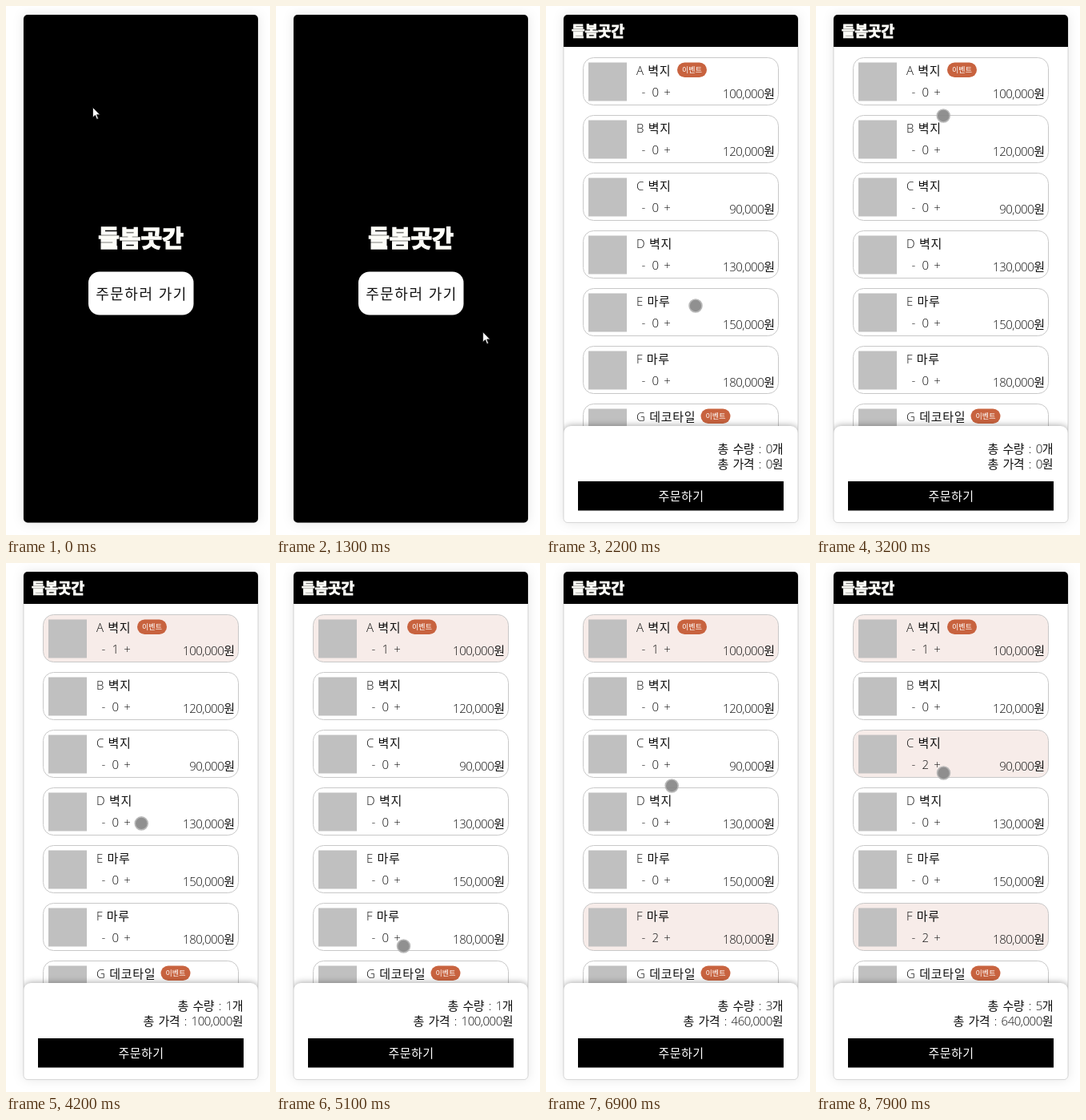
These frames come from a looping animation (330 by 660 pixels, 8000 ms). An HTML page:

```html
<!DOCTYPE html>
<html lang="ko">
<head>
<meta charset="utf-8">
<style>
html, body { margin: 0; width: 100%; height: 100%; overflow: hidden; background: #fff; }
svg { display: block; width: 330px; height: 660px; font: 300 15px "Open Sans", "Noto Sans CJK KR", "Noto Sans CJK", sans-serif; fill: #111; }
.phone { filter: drop-shadow(0 0 7px rgba(0,0,0,.1)); }
.sheet { filter: drop-shadow(0 0 4px rgba(0,0,0,.4)); }
.brand { font-weight: 900; fill: #fdfdf8; stroke: #fdfdf8; stroke-width: .05em; }
.mid { text-anchor: middle; }
.end { text-anchor: end; letter-spacing: -.5px; word-spacing: 2.3px; }
.name { letter-spacing: .7px; }
.badge { font-size: 9px; fill: #fff; }
.start { font-size: 18px; letter-spacing: 1.5px; }
.order { letter-spacing: .5px; fill: #fff; }
</style>
</head>
<body>
<svg viewBox="0 0 330 660">
  <defs><clipPath id="screen"><rect x="22" y="11" width="293" height="633.5" rx="5"/></clipPath></defs>
  <rect class="phone" x="22" y="11" width="293" height="633.5" rx="5" fill="#fff"/>
  <g id="view" clip-path="url(#screen)"></g>
  <rect x="22" y="11" width="293" height="633.5" rx="5" fill="none" stroke="#000" stroke-opacity=".15"/>
  <path id="arrow" d="M.5 .5V13l3-2.7 2 5 2-.8-2-4.8h4z" fill="#fff" stroke="#111" stroke-width=".8"/>
  <circle id="touch" r="8" fill="#878787" stroke="#b4b4b4" stroke-width="1.6" opacity=".92"/>
</svg>
<script>
const LOOP = 8000, STEP = 100, PRESS = 2000, OPEN = 2200, TRAVEL = 600;
const BRAND = '들봄곳간';
const $ = id => document.getElementById(id);

const items = [
  { kind: '벽지', price: 100000, event: true },
  { kind: '벽지', price: 120000 },
  { kind: '벽지', price: 90000 },
  { kind: '벽지', price: 130000 },
  { kind: '마루', price: 150000 },
  { kind: '마루', price: 180000 },
  { kind: '데코타일', price: 110000, event: true }
];
// The finger sets off for each row, then taps its plus sign.
const visits = [
  { leave: 2700, row: 0, taps: [3700] },
  { leave: 3870, row: 5, taps: [5600, 6200] },
  { leave: 6400, row: 2, taps: [7400, 7700] }
];

const cardTop = row => 64 + 72 * row;
const clamp = u => Math.min(1, Math.max(0, u));
const ease = u => u * u * (3 - 2 * u);
const mix = (a, b, p) => a.map((v, n) => v + (b[n] - v) * p);

function arrowAt(t) {
  return t < 1000
    ? mix([108, 126], [11, 127], clamp(t / 200))
    : mix([286, 421], [178.5, 364], ease(clamp((t - 1100) / 600)));
}

// Each trip bows left on the way up and right on the way down.
function touchAt(t) {
  return visits.reduce((from, { leave, row }) => {
    const to = [159.5, cardTop(row) + 54];
    const p = ease(clamp((t - leave) / TRAVEL));
    const [x, y] = mix(from, to, p);
    return [x + 10 * Math.sin(Math.PI * p) * Math.sign(to[1] - from[1]), y];
  }, [187, 374]);
}

const rect = (x, y, w, h, fill, more = '') =>
  `<rect x="${x}" y="${y}" width="${w}" height="${h}" fill="${fill}" ${more}/>`;
const text = (x, y, s, cls, more = '') => `<text x="${x}" y="${y}" class="${cls}" ${more}>${s}</text>`;
const won = n => n.toLocaleString('en-US') + '원';

function startPage(pressed) {
  const button = (fill, more) => rect(103, 331.5, 131.5, 54, fill, more);
  return rect(22, 11, 293, 634, '#000') +
    text(168.5, 301, BRAND, 'brand mid', 'font-size="29"') +
    button('#fff', 'rx="14"') +
    text(169.5, 365.5, '주문하러 가기', 'start mid') +
    (pressed ? button('rgba(100,180,222,.4)') : '');
}

function badge(x, y) {
  return rect(x, y, 37, 18.5, '#c8633f', 'rx="9.25"') + text(x + 18.5, y + 12.2, '이벤트', 'badge mid');
}

function card({ kind, price, event }, row, count) {
  const y = cardTop(row);
  return rect(46.5, y + .5, 244, 59, count ? '#f7ece9' : '#fff', 'rx="13" stroke="#c8c8c8"') +
    rect(53, y + 6.5, 48, 48, '#c0c0c0') +
    text(113, y + 21.5, 'ABCDEFG'[row] + ' ' + kind, 'name') +
    (event ? badge(134.5 + 14.75 * kind.length, y + 6.5) : '') +
    ['-', count, '+'].map((s, n) => text(122 + 14.8 * n, y + 49, s, 'mid')).join('') +
    text(285.5, y + 51, won(price), 'end');
}

function shopPage(counts) {
  const sum = f => counts.reduce((total, n, row) => total + n * f(row), 0);
  return rect(22, 11, 293, 634, '#fff') +
    rect(22, 11, 293, 40, '#000') +
    text(65, 38, BRAND, 'brand mid', 'font-size="18"') +
    items.map((item, row) => card(item, row, counts[row])).join('') +
    rect(22, 524, 293, 135, '#fff', 'rx="9" class="sheet"') +
    text(296, 557.5, `총 수량 : ${sum(() => 1)}개`, 'end') +
    text(296, 577, `총 가격 : ${won(sum(row => items[row].price))}`, 'end') +
    rect(40, 593, 257, 36.5, '#000') +
    text(169, 616.5, '주문하기', 'order mid');
}

function place(el, point, shown) {
  el.setAttribute('transform', `translate(${point})`);
  el.setAttribute('visibility', shown ? 'visible' : 'hidden');
}

let last;
function draw(now) {
  const t = Math.floor(now % LOOP / STEP) * STEP;
  const counts = items.map((_, row) =>
    visits.filter(v => v.row === row).flatMap(v => v.taps).filter(at => t >= at).length);
  const html = t < OPEN ? startPage(t >= PRESS) : shopPage(counts);
  if (html !== last) $('view').innerHTML = last = html;
  place($('arrow'), arrowAt(t), t < 400 || t >= 1100 && t < OPEN);
  place($('touch'), touchAt(t), t >= OPEN);
}

const began = performance.now();
function tick() {
  draw(performance.now() - began);
  requestAnimationFrame(tick);
}
tick();
</script>
</body>
</html>
```
